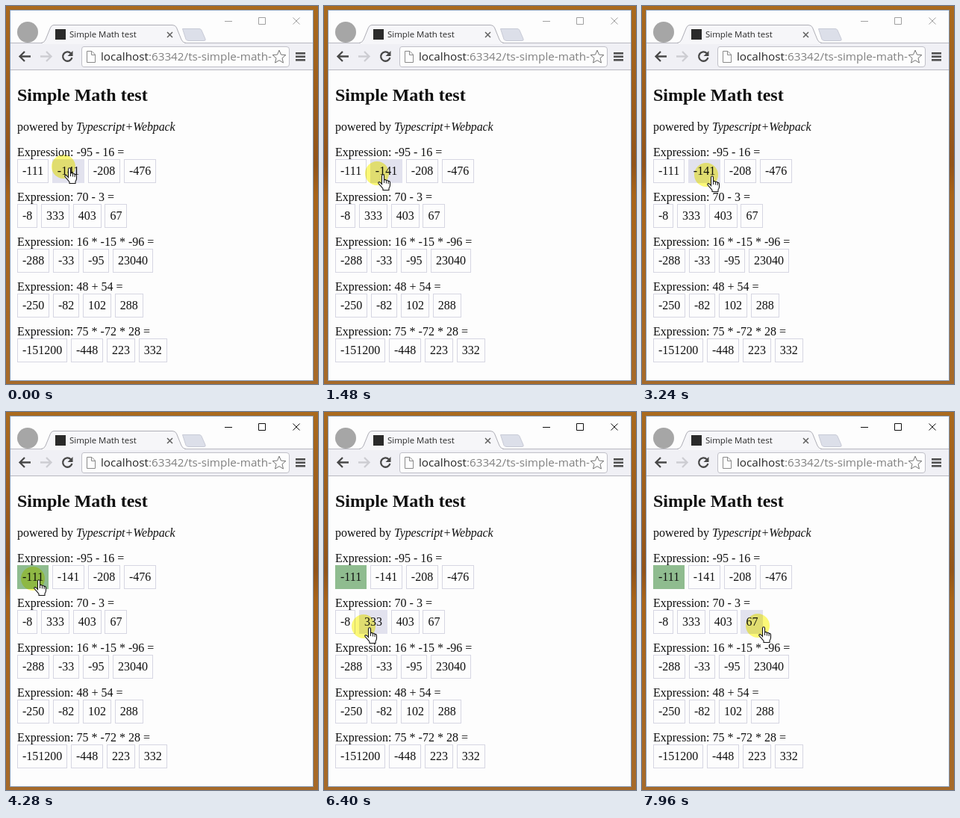
These frames come from a looping animation (418x506 px, 8000 ms). An HTML page with a canvas:

```html
<!DOCTYPE html>
<html lang="en">
<head>
<meta charset="utf-8">
<title>Simple Math test</title>
<style>
  html, body { margin: 0; width: 100%; height: 100%; overflow: hidden; background: #a8661c; }
  canvas { display: block; width: 418px; height: 506px; }
</style>
</head>
<body>
<canvas id="stage" width="418" height="506"></canvas>
<script>
const ctx = document.getElementById('stage').getContext('2d');
ctx.fontKerning = 'normal';
ctx.textRendering = 'optimizeLegibility';

const LOOP = 8000;
const CLICK = 4200;
const SERIF = '"Liberation Serif", serif';
const SANS = '"Open Sans", sans-serif';
const PAPER = '#fdfdfd';
const BODY = '16px ' + SERIF;

const rows = [
  ['-95 - 16', '-111', '-141', '-208', '-476'],
  ['70 - 3', '-8', '333', '403', '67'],
  ['16 * -15 * -96', '-288', '-33', '-95', '23040'],
  ['48 + 54', '-250', '-82', '102', '288'],
  ['75 * -72 * 28', '-151200', '-448', '223', '332']
];

// Pointer path: time, x, y
const path = [
  [0, 77, 215], [840, 94, 220], [2040, 53, 227], [2500, 58, 227],
  [3240, 86, 226], [3900, 36, 223], [4350, 36, 223], [5240, 70, 293],
  [6400, 53, 287], [7000, 92, 290], [7960, 155, 286], [8000, 155, 286]
];

const hand = new Path2D('M5.5 13.5V2.4Q5.5 .7 7 .7Q8.5 .7 8.5 2.4V8Q10.3 6.5 11.3 8.6' +
  'Q13.2 7.4 14 9.6Q16.5 8.8 16.5 11.6V15Q16.5 17 15 19V21.5H7V19.5' +
  'Q5.5 17.5 4 15.8L1 12.5Q.2 10.6 2.2 10.6Q3.6 10.8 5.5 13.5Z');

function pointerAt(t) {
  let i = 0;
  while (i < path.length - 2 && t >= path[i + 1][0]) i++;
  const [t0, x0, y0] = path[i], [t1, x1, y1] = path[i + 1];
  const u = (t - t0) / (t1 - t0);
  const k = u * u * (3 - 2 * u);
  return { x: Math.round(x0 + (x1 - x0) * k), y: Math.round(y0 + (y1 - y0) * k) };
}

function text(str, x, y, font, color = '#101010') {
  ctx.font = font;
  ctx.fillStyle = color;
  ctx.fillText(str, x, y);
  return x + ctx.measureText(str).width;
}

function fill(color, x, y, w, h) {
  ctx.fillStyle = color;
  ctx.fillRect(x, y, w, h);
}

function disc(color, x, y, r) {
  ctx.fillStyle = color;
  ctx.beginPath();
  ctx.arc(x, y, r, 0, Math.PI * 2);
  ctx.fill();
}

function stroke(d, color, width = 1) {
  ctx.strokeStyle = color;
  ctx.lineWidth = width;
  ctx.stroke(new Path2D(d));
}

function shape(d, color, line) {
  ctx.fillStyle = color;
  ctx.fill(new Path2D(d));
  stroke(d, line);
}

function drawDesktop() {
  const g = ctx.createLinearGradient(0, 0, 0, 506);
  g.addColorStop(0, '#aa6a1e');
  g.addColorStop(0.42, '#92541a');
  g.addColorStop(0.5, '#a8641a');
  g.addColorStop(1, '#a66a2a');
  fill(g, 0, 0, 418, 506);
  fill('#7f93ac', 5, 5, 407, 497);
  fill(PAPER, 6, 6, 405, 495);
}

function drawTitleBar(active) {
  disc('#a6a6a6', 29, 35, 14);

  fill('#f0f0f5', 6, 50, 405, 35);
  stroke('M6 49.5H411', '#b8b8c0');
  fill('#b8b8c0', 6, 85, 405, 1);

  shape('M236.5 30.5H259Q261 30.5 262 32.5L267 44Q268 46.5 265 46.5H245Q242 46.5 241 44.5Z',
    '#dcdfe9', '#c8cad6');
  const tab = 'M47 49.5Q51 49.5 53 45L59.5 29Q61 25.5 64 25.5H223Q227 25.5 228.5 29L235 45Q237 49.5 241 49.5';
  shape(tab, '#f6f6f9', '#aeaeb6');
  fill('#f6f6f9', 49, 49, 190, 2);

  fill('#2a2a2a', 66, 31, 14, 14);
  text('Simple Math test', 85, 42, '11.45px ' + SANS, '#282828');
  stroke('M216 35L223 42M223 35L216 42', '#606060', 1.5);

  const ink = active ? '#101010' : '#a0a0a0';
  stroke('M293 20.5H303M338.5 15.5H347.5V24.5H338.5ZM384.5 15.5L393.5 24.5M393.5 15.5L384.5 24.5', ink);
}

function drawToolbar() {
  stroke('M33 67.5H19M25 61L18.5 67.5L25 74', '#484848', 2.3);
  stroke('M46 67.5H60M54 61L60.5 67.5L54 74', '#cdcdd2', 2.3);
  stroke('M86.8 63.2A6.2 6.2 0 1 0 88.4 69', '#484848', 2.3);
  ctx.fillStyle = '#484848';
  ctx.fill(new Path2D('M89.5 60V67H82.5Z'));

  shape('M104 54.5H376Q379.5 54.5 379.5 58V78Q379.5 81.5 376 81.5H104Q101.5 81.5 101.5 78V58Q101.5 54.5 104 54.5Z',
    PAPER, '#c0c0c8');
  shape('M108.5 60.5H115L119.5 65V75.5H108.5Z', PAPER, '#8a8a8a');
  stroke('M114.5 60.5V65.5H119.5', '#8a8a8a');

  const url = '15.25px ' + SANS;
  const x = text('localhost', 127, 73, url, '#282828');
  text(':63342/ts-simple-math-', x, 73, url, '#808080');

  let star = '';
  for (let i = 0; i < 10; i++) {
    const r = i % 2 ? 4.2 : 9.3;
    const a = i * Math.PI / 5 - Math.PI / 2;
    star += (i ? 'L' : 'M') + (366 + r * Math.cos(a)) + ' ' + (68.5 + r * Math.sin(a));
  }
  shape(star + 'Z', PAPER, '#747474');
  for (let i = 0; i < 3; i++) fill('#505050', 388, 62 + i * 4.5, 13, 2.6);
}

function drawPage(pointer, solved) {
  text('Simple Math test', 15, 127, 'bold 24px ' + SERIF);
  const x = text('powered by ', 15, 167, BODY);
  ctx.letterSpacing = '-0.1px';
  text('Typescript+Webpack', x, 167, 'italic ' + BODY);
  ctx.letterSpacing = '0px';
  rows.forEach(([expr, ...answers], row) => {
    const y = 205 + row * 60;
    text(`Expression: ${expr} =`, 15, y - 4, BODY);
    let left = 15;
    answers.forEach((answer, col) => {
      ctx.font = BODY;
      const w = ctx.measureText(answer).width + 14;
      const x0 = Math.round(left), x1 = Math.round(left + w);
      const hover = pointer.x >= x0 && pointer.x < x1 && pointer.y >= y && pointer.y < y + 32;
      const done = solved && row === 0 && col === 0;
      const color = done ? '#8fbc8f' : hover ? '#e2e2ee' : PAPER;
      fill(done || hover ? color : '#d6d6e2', x0, y, x1 - x0, 32);
      fill(color, x0 + 1, y + 1, x1 - x0 - 2, 30);
      text(answer, left + 7, y + 21, BODY);
      left += w + 4.7;
    });
  });
}

function drawPointer({ x, y }) {
  ctx.globalCompositeOperation = 'multiply';
  disc('#fdfa78', x, y, 16);
  ctx.globalCompositeOperation = 'source-over';

  ctx.save();
  ctx.translate(x + 1, y + 1);
  ctx.fillStyle = '#ffffff';
  ctx.fill(hand);
  ctx.strokeStyle = '#141414';
  ctx.lineWidth = 1.1;
  ctx.stroke(hand);
  stroke('M8.5 8V12M11.4 9V12.5M14.1 10V13', '#141414');
  ctx.restore();
}

function draw(now) {
  const t = now % LOOP;
  const clicked = t >= CLICK;
  const pointer = pointerAt(t);
  drawDesktop();
  drawTitleBar(clicked);
  drawToolbar();
  drawPage(pointer, clicked);
  drawPointer(pointer);
  requestAnimationFrame(() => draw(performance.now() - start));
}

const start = performance.now();
draw(0);
</script>
</body>
</html>
```
